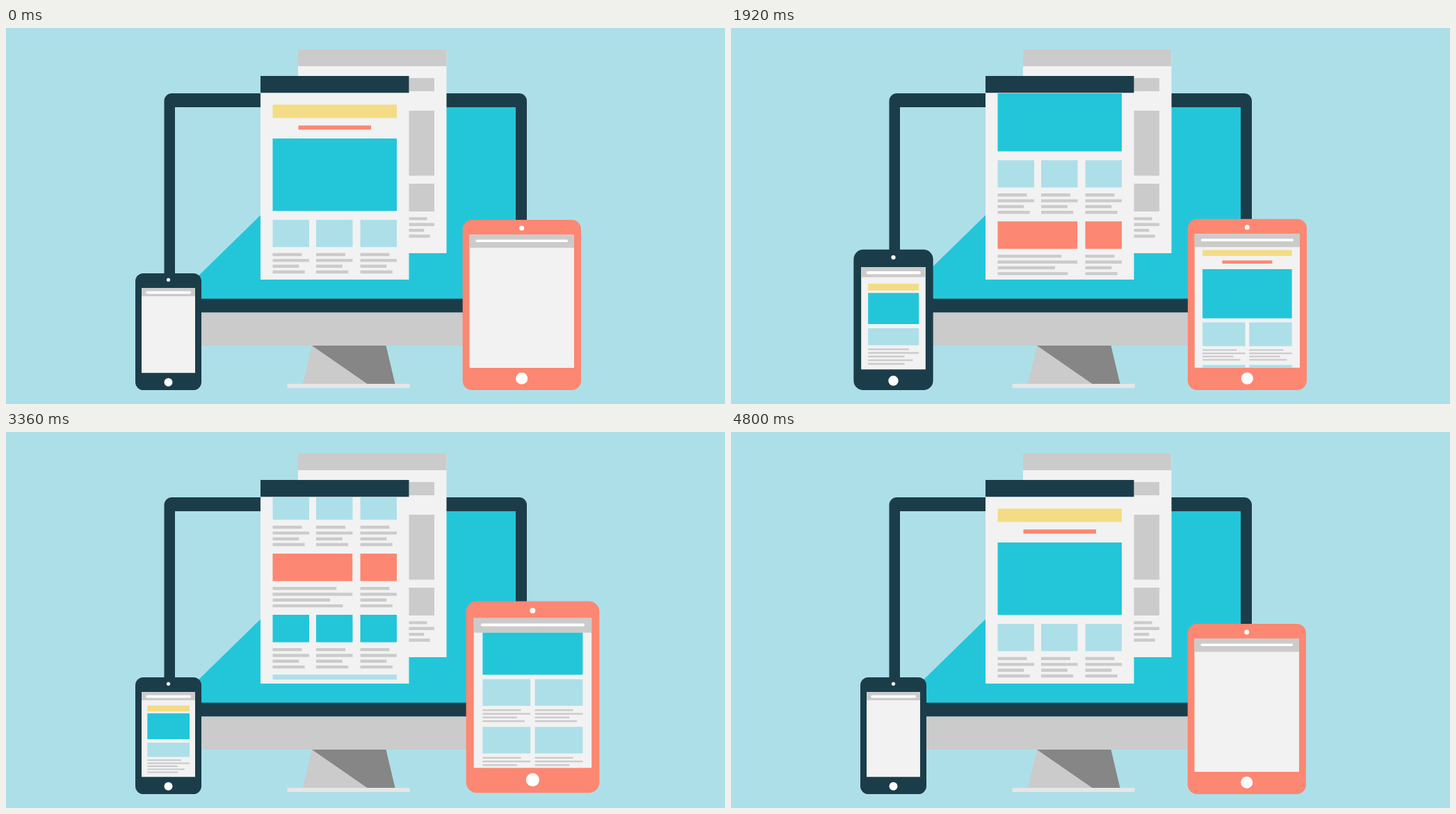
An HTML page with a canvas for the animation above (5040 ms loop, 1034x541 px).

```html
<!DOCTYPE html>
<html lang="en">
<head>
<meta charset="utf-8">
<title>Responsive layout</title>
<style>
html, body { margin: 0; width: 100%; height: 100%; overflow: hidden; background: #addfe9; }
canvas { display: block; }
</style>
</head>
<body>
<canvas id="stage" width="1034" height="541"></canvas>
<script>
const ctx = document.getElementById('stage').getContext('2d');
const SKY = '#addfe9', DARK = '#1b3d49', TEAL = '#23c6d9', CORAL = '#fc8772', GRAY = '#cbcbcb',
      PAPER = '#f2f2f2', YELLOW = '#f4dc86', SHADE = '#868686', WHITE = '#fff';
const LOOP = 5040, STEP = 40;

// Boxes are given by their edges: left, top, right, bottom.
function box(color, l, t, r, b, radius = 0) {
  ctx.fillStyle = color;
  ctx.beginPath();
  ctx.roundRect(l, t, r - l, b - t, radius);
  ctx.fill();
}

function dot(x, y, r) {
  ctx.fillStyle = WHITE;
  ctx.beginPath();
  ctx.arc(x, y, r, 0, 7);
  ctx.fill();
}

function poly(color, ...points) {
  ctx.fillStyle = color;
  ctx.beginPath();
  for (const [x, y] of points) ctx.lineTo(x, y);
  ctx.fill();
}

// A ragged paragraph; every column uses the same line proportions.
function text(x, y, width, gap = 8.35, height = 4.4, count = 4) {
  const ragged = [.8, 1, .72, .88, .72];
  for (let i = 0; i < count; i++, y += gap) box(GRAY, x, y, x + width * ragged[i], y + height);
}

function clipped(l, t, r, b, draw) {
  ctx.save();
  ctx.beginPath();
  ctx.rect(l, t, r - l, b - t);
  ctx.clip();
  draw();
  ctx.restore();
}

function scaleAt(x, y, s) {
  ctx.translate(x, y);
  ctx.scale(s, s);
  ctx.translate(-x, -y);
}

const progress = (n, from, to) => Math.min(1, Math.max(0, (n - from) / (to - from)));
const sine = x => (1 - Math.cos(Math.PI * x)) / 2;
const ramp = (n, from, to) => sine(progress(n, from, to));
// Like ramp, with a longer slow-down.
const glide = (n, from, to) => sine(1 - (1 - progress(n, from, to)) ** 1.6);

function monitor() {
  box(DARK, 227.5, 94, 749, 409.5, [11, 11, 0, 0]);
  box(TEAL, 243, 114, 733, 389.5);
  poly(SKY, [243, 114], [525, 114], [243, 389.5]);
  box(GRAY, 227.5, 409.5, 749, 457, [0, 0, 11, 11]);
  poly(GRAY, [440, 457], [546.5, 457], [559.5, 512], [427, 512]);
  poly(SHADE, [440, 457], [546.5, 457], [559.5, 512], [519.5, 512]);
  box('#e6e6e6', 404.5, 512, 580.5, 518);
}

function backPage() {
  box(PAPER, 420, 31, 633.5, 324);
  box(GRAY, 420, 31, 633.5, 55);
  box(GRAY, 563.5, 72, 616, 91);
  box(GRAY, 563.5, 119, 616, 212.5);
  box(GRAY, 563.5, 224, 616, 264);
  text(563.5, 272.2, 52.5);
}

function frontPage(scroll) {
  const cell = (color, x, y, width = 52.5) => {
    box(color, x, y, x + width, y + 39.4);
    text(x, y + 47.9, width);
  };
  const row = (color, y) => [383.5, 446, 509.5].forEach(x => cell(color, x, y));
  box(PAPER, 366, 69, 579.5, 362);
  clipped(366, 94, 579.5, 362, () => {
    ctx.translate(0, -scroll);
    box(YELLOW, 383.5, 110.3, 562, 129.5);
    box(CORAL, 420.5, 140.3, 525, 146.3);
    box(TEAL, 383.5, 159, 562, 263.2);
    row(SKY, 275.9);
    cell(CORAL, 383.5, 364, 114.7);
    cell(CORAL, 509.5, 364);
    row(TEAL, 452);
    box(SKY, 383.5, 538, 562, 545.3);
  });
  box(DARK, 366, 69, 579.5, 93.3);
}

function phone(lift, content) {
  ctx.save();
  scaleAt(233.5, 521, 1 + lift);
  box(DARK, 186, 353, 281, 521, 11.5);
  box(PAPER, 195, 374, 272, 496.3);
  box(GRAY, 195, 374, 272, 386);
  box(WHITE, 201.2, 378.8, 266.2, 382.4, 1.8);
  dot(233.5, 362.3, 2.6);
  dot(233.5, 509.8, 6);
  clipped(195, 386, 272, 496.3, () => {
    scaleAt(233.5, 441, content);
    box(YELLOW, 203.3, 393.6, 264, 402);
    box(TEAL, 203.3, 404.8, 264, 442);
    box(SKY, 203.3, 447, 264, 467.4);
    text(203.3, 471.1, 60.7, 4.35, 2.2, 5);
  });
  ctx.restore();
}

function tablet(lift, content) {
  ctx.save();
  scaleAt(617, 535, 1 + .15 * lift);
  box(CORAL, 656.7, 276, 827, 521, 13.5);
  box(PAPER, 666.5, 297.5, 817, 489);
  box(GRAY, 666.5, 297.5, 817, 316.3);
  box(WHITE, 675.5, 304.4, 808, 308, 1.8);
  dot(741.7, 288, 3.5);
  dot(741.7, 504.3, 8.5);
  clipped(666.5, 316.3, 817, 489, () => {
    scaleAt(741.7, 404, content);
    ctx.translate(0, -60 * lift);
    box(YELLOW, 677.8, 322.5, 805.7, 331);
    box(CORAL, 706, 337.4, 777.6, 342);
    box(TEAL, 677.8, 350, 805.7, 420.2);
    for (const y of [426.1, 486.9]) for (const x of [677.8, 744.6]) {
      box(SKY, x, y, x + 61.1, y + 34);
      text(x, y + 38.5, 61.1, 4.65, 2.2);
    }
  });
  ctx.restore();
}

function draw(now) {
  // 24 poses a second, shown in 25 steps: one step in each second repeats.
  const step = Math.min(120, Math.floor(now % LOOP / STEP));
  const n = step - Math.floor((step + 13) / 25);
  const move = (ease, from, to) => ease(n, from, to);

  box(SKY, 0, 0, 1034, 541);
  monitor();
  backPage();
  frontPage(48 * move(ramp, 5, 30) + 100 * move(glide, 35, 73) + 50 * move(glide, 70, 90)
    - 198 * move(ramp, 87.5, 115));
  phone(.21 * (move(ramp, 23, 36) - move(ramp, 43.5, 65.5)), move(ramp, 5, 18) - move(ramp, 84, 96));
  tablet(move(glide, 44, 71) - move(glide, 77, 100), move(ramp, 23, 36) - move(ramp, 100, 112));
}

const start = performance.now();
function tick() {
  draw(performance.now() - start);
  requestAnimationFrame(tick);
}
tick();
</script>
</body>
</html>
```
